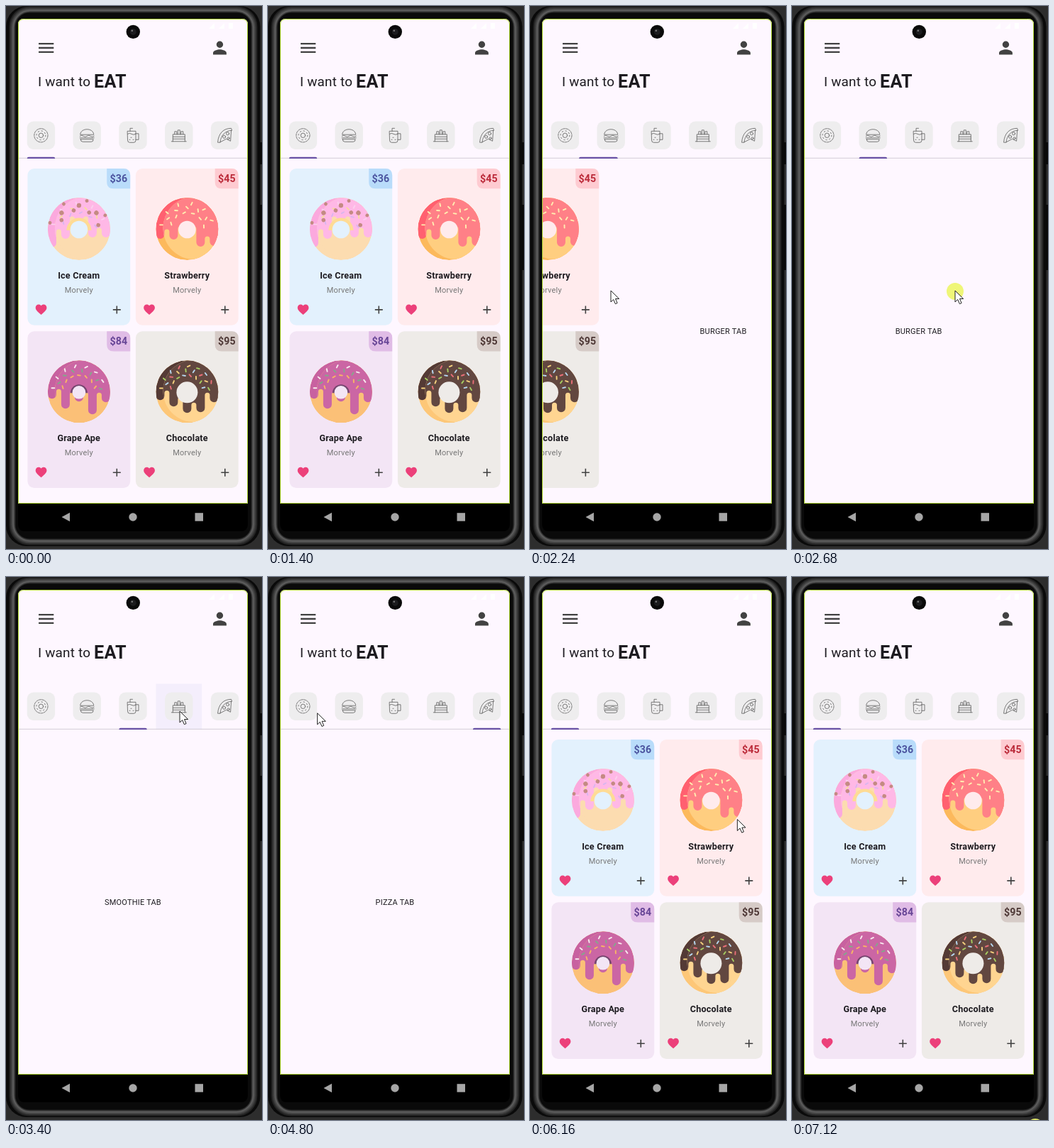
Animation, 361 px wide and 765 px high, one loop 7200 ms. Source, as an HTML page:

```html
<!DOCTYPE html>
<html lang="en">
<head>
<meta charset="utf-8">
<title>Donut menu</title>
<style>
html, body { margin: 0; width: 100%; height: 100%; overflow: hidden; background: #2d2d2d; }
svg { display: block; width: 100%; height: 100%; }
text { font-family: Roboto, sans-serif; letter-spacing: .2px; fill: #1d1b20; }
.mid { text-anchor: middle; }
.icon { fill: none; stroke: #5c5c5c; stroke-width: .8; stroke-linejoin: round; stroke-linecap: round; }
</style>
</head>
<body>
<svg viewBox="0 0 361 765" xmlns="http://www.w3.org/2000/svg">
  <defs>
    <clipPath id="view"><rect x="17.5" y="215" width="323" height="485"/></clipPath>
    <clipPath id="round"><circle r="44"/></clipPath>
    <clipPath id="lit"><circle cx="10" cy="-1" r="44"/></clipPath>
  </defs>

  <rect width="361" height="765" fill="#2d2d2d"/>
  <path d="M357 192h4v31h-4zM357 280h4v92h-4z" fill="#080808"/>
  <rect width="358.5" height="761" rx="29" fill="#0a0a0a"/>
  <g id="shell" fill="none"></g>
  <path d="M17 690H341V730q0 10-10 10H27q-10 0-10-10z" fill="#000"/>
  <path d="M17 701V26q0-8 8-8H333q8 0 8 8V701z" fill="#fef7ff"/>

  <path d="M286 32l8-8v8zM300 32l8-8v8zM314 24h6v8h-6z" fill="#fff"/>
  <circle cx="179.3" cy="36.4" r="9.7" fill="#0a0a0a"/>
  <circle cx="179.3" cy="36.4" r="4.5" fill="#1c1c1e"/>
  <circle cx="177.8" cy="34.8" r="1.3" fill="#777"/>
  <g fill="#424242">
    <path transform="translate(42.5 44.8) scale(1.18)" d="M3 6h18v2H3zM3 11h18v2H3zM3 16h18v2H3z"/>
    <path transform="translate(287.3 44.8) scale(1.18)"
      d="M12 12a4 4 0 1 0 0-8 4 4 0 0 0 0 8zm0 2c-2.67 0-8 1.34-8 4v2h16v-2c0-2.66-5.33-4-8-4z"/>
  </g>
  <text x="45" y="113" font-size="18.9" xml:space="preserve">I want to <tspan dy="2" font-size="25.2" font-weight="700">EAT</tspan></text>

  <rect id="hover" y="150.5" width="64.8" height="64" fill="#f4eefc"/>
  <g id="tabs"></g>
  <path d="M17.5 214.3H340.5" stroke="#d2ccd6"/>
  <path id="bar" fill="#6750a4"/>
  <g id="pages" clip-path="url(#view)"></g>

  <path d="M17.5 700.5V26q0-7.5 8-7.5H332.5q8 0 8 7.5V700.5z" fill="none" stroke="#b5dc35"/>
  <g fill="#a6a6a6">
    <path d="M78.5 720l11.5-6.3v12.6z"/><circle cx="179" cy="720" r="5.7"/>
    <path d="M266.5 714.2h11.5v11.5h-11.5z"/>
  </g>

  <g id="mouse">
    <circle id="press" r="12" cy="1" fill="#eef56c" opacity=".92"/>
    <path d="M0 0V16l3.7-3.5 2.7 6.2 2.7-1.2-2.6-6H11.7z" fill="#fff" stroke="#222"/>
  </g>
</svg>
<script>
const LOOP = 7200, PAGE = 324, TAB = 64.8;
const $ = id => document.getElementById(id);
const clamp = v => Math.max(0, Math.min(1, v));
const mix = (a, b, u) => a + (b - a) * u;
const smooth = u => u * u * (3 - 2 * u);
const repeat = (n, make) => Array.from({ length: n }, (_, i) => make(i)).join('');

// Metal rim: nested outlines, brighter towards the middle
$('shell').innerHTML = repeat(4, i => {
  const inset = 9 + i * .4, grey = 34 + i * 20;
  return `<rect x="${inset}" y="${inset - 4}" width="${359 - 2 * inset}" height="${760 - 2 * inset + 8}"
    rx="24" stroke="rgb(${grey},${grey},${grey})" stroke-width="${9 - i * 2.5}"/>`;
});

// Tab icons, centred on 0,0
const icons = [
  `<circle r="9.6" stroke-dasharray="3 1.2"/><circle r="3.2"/><circle r="6.4" stroke-dasharray="1.5 3.5"/>`,
  `<path d="M-9.5-1.5C-9-11 9-11 9.5-1.5zM-10 1q2.5-2 5 0t5 0 5 0 5 0M-10 3.5h20M-9 5.5H9q0 3.5-3 3.5H-6q-3 0-3-3.5z"/>`,
  `<path d="M-7.5-6H4V7q0 3-3 3h-5.5q-3 0-3-3zM4-2.5h4V6H4M-7.5-2q3-2 5.5 0t6 0M-4-6v-4h3.5M-3 3h1M0 6h1M-5 6h1"/>`,
  `<path d="M-10.5 8.5h21M-8.5 8.5V-1.5h17v10M-8.5 2h17M-8.5 5h17M-6-1.5v-4h3v4M-1.5-1.5v-6h3v6M3-1.5v-4h3v4"/>`,
  `<path d="M-10 9.5C-9-3-2-10 9-10l1 3C1-7-6 0-6.5 9.5zM9-7L8 8 2 5-6.5 9.500"/>
   <circle cx="-1" cy="2" r="2"/><circle cx="4" cy="-2.500" r="2"/><circle cx="5" cy="4" r="1.500"/>`
];
$('tabs').innerHTML = repeat(icons.length, i => {
  const x = 17 + TAB * (i + .5);
  return `<rect x="${x - 19.7}" y="162.5" width="39.4" height="39.4" rx="9" fill="#eeedee"/>
    <g class="icon" transform="translate(${x} 182.3)">${icons[i]}</g>`;
});

// drips: icing lengths from right to left; base and icing: shaded, lit
const donuts = [
  { name: 'Ice Cream', price: 36, card: '#e3f1fd', tag: '#b9dcfa', ink: '#4c55a0',
    base: ['#fcdcb0', '#fcdcb0'], icing: ['#fba9de', '#ffb8e6'], drips: [6, 6, -10, 8, 20],
    hole: 12.3, ring: '#fedb95', ringSize: 17.5, bits: ['#fbd0ee', '#d9b6ee', '#f6dc9c'], count: 14, balls: 11 },
  { name: 'Strawberry', price: 45, card: '#ffebed', tag: '#fecbd1', ink: '#bb2b3a',
    base: ['#fcb95c', '#ffce80'], icing: ['#ff6070', '#ff8087'], drips: [18, 19, 4, 9, 8],
    hole: 12.3, bits: ['#ffedb0'], count: 17 },
  { name: 'Grape Ape', price: 84, card: '#f3e5f5', tag: '#e0bce6', ink: '#674596',
    base: ['#fbc077', '#fbc077'], icing: ['#c861a0', '#cb66a4'], drips: [9, 26, 8, 18, 4],
    hole: 9.3, ring: '#75466f', ringSize: 12, bits: ['#f8e9ee', '#f8b564', '#83a98a'], count: 21 },
  { name: 'Chocolate', price: 95, card: '#eeebe8', tag: '#d6cbc7', ink: '#4e3836',
    base: ['#fdc778', '#ffd591'], icing: ['#543a35', '#624740'], drips: [9, 23, 24, 15, 6],
    hole: 15, bits: ['#f6d17d', '#e96f78', '#b6d8f0', '#a7cf61'], count: 24 }
];

// Round drips 12 wide with round gaps 7 wide between them
function icingPath(drips) {
  return 'M-44 0A44 44 0 0 1 44 0' + drips.map((y, i) => {
    const gap = i < 4 ? `V${Math.min(y, drips[i + 1]) - 4}a3.5 3.5 0 0 0-7 0` : '';
    return `V${y}a6 6 0 0 1-12 0${gap}`;
  }).join('') + 'z';
}

// Spread n marks over the upper half of a donut
function scatter(n, radii, mark) {
  return repeat(n, i => {
    const a = Math.PI * (1.03 + .94 * (i + .5) / n), r = radii[i % 3];
    return `<g transform="translate(${r * Math.cos(a)} ${r * Math.sin(a) + 1}) rotate(${i * 73})">${mark(i)}</g>`;
  });
}

function donutArt(d) {
  const path = icingPath(d.drips);
  const layer = k => `<circle r="44" fill="${d.base[k]}"/><path d="${path}" fill="${d.icing[k]}"/>`;
  const bits = scatter(d.count, [37, 24, 31], i => `<path d="M-1.9 0h3.8" stroke="${d.bits[i % d.bits.length]}"/>`);
  const balls = scatter(d.balls || 0, [42, 28, 34], i => `<circle r="${2.4 + i % 3 * .4}" fill="#c48a83"/>`);
  const ring = d.ring ? `<path d="M${-d.ringSize} 2a${d.ringSize} ${d.ringSize} 0 0 1 ${2 * d.ringSize} 0z" fill="${d.ring}"/>` : '';
  return `<g clip-path="url(#round)">${layer(0)}<g clip-path="url(#lit)">${layer(1)}</g></g>
    <g stroke-width="1.9" stroke-linecap="round">${bits}</g>${ring}${balls}
    <circle cy="1" r="${d.hole}" fill="${d.card}"/>`;
}

function card(d, i) {
  const x = 30.4 + 152.5 * (i % 2), y = 229 + 229.3 * (i >> 1);
  return `<g transform="translate(${x} ${y})">
    <rect width="144.8" height="220.7" rx="9.5" fill="${d.card}"/>
    <path d="M111.8 0h23.5q9.5 0 9.5 9.5V28.3h-23.5q-9.5 0-9.5-9.5z" fill="${d.tag}"/>
    <text class="mid" x="128.5" y="18.6" font-size="14.2" font-weight="700" style="fill:${d.ink}">$${d.price}</text>
    <g transform="translate(72.5 85)">${donutArt(d)}</g>
    <text class="mid" x="72.4" y="155" font-size="12.6" font-weight="700">${d.name}</text>
    <text class="mid" x="72.4" y="174.5" font-size="11" style="fill:#777">Morvely</text>
    <path transform="translate(9.7 189.2) scale(.7875)" fill="#ec407a" d="M12 21.35l-1.45-1.32C5.4 15.36 2 12.28 2 8.5 2 5.42 4.42 3 7.5 3c1.74 0 3.41.81 4.5 2.09C13.09 3.81 14.76 3 16.5 3 19.58 3 22 5.42 22 8.5c0 3.78-3.4 6.86-8.55 11.54z"/>
    <path d="M120.4 198.9h11M125.9 193.4v11" stroke="#424242" stroke-width="1.6"/>
  </g>`;
}

const label = name => `<text class="mid" x="179" y="462" font-size="11">${name} TAB</text>`;
const pages = { 0: donuts.map(card).join(''), 1: label('BURGER'), 2: label('SMOOTHIE'), 4: label('PIZZA') };
$('pages').innerHTML = Object.entries(pages).map(([k, art]) => `<g id="page${k}">${art}</g>`).join('');

// CSS "ease": cubic-bezier(.25, .1, .25, 1)
function ease(u) {
  let lo = 0, hi = 1, s = u;
  for (let i = 0; i < 20; i++) {
    s = (lo + hi) / 2;
    if (.75 * s * (1 - s) + s ** 3 < u) lo = s; else hi = s;
  }
  return .3 * s * (1 - s) ** 2 + 3 * s * s * (1 - s) + s ** 3;
}
// Finger drag for 120 ms, then a fling that slows down
function swipe(u) {
  const ms = u * 510;
  return ms < 120 ? .001 * ms : 1 - .88 * (1 - (ms - 120) / 390) ** 3;
}

const moves = [
  { at: 2000, len: 510, from: 0, to: 1, curve: swipe },
  { at: 2680, len: 510, from: 1, to: 2, curve: swipe },
  { at: 4080, len: 300, from: 2, to: 4, curve: ease },
  { at: 4950, len: 300, from: 4, to: 0, curve: ease }
];
// Pointer trips: leave, arrive, x, y
const trips = [
  [1380, 1960, 153, 401], [2000, 2120, 114, 401], [2400, 2640, 230, 401], [2680, 2800, 191, 401],
  [2920, 3360, 245, 189], [3440, 3720, 306, 188], [4300, 4880, 57, 192],
  [5660, 5860, 292, 338], [6140, 6460, 320, 619], [6660, 6980, 343, 774]
];

function pointer(t) {
  return trips.reduce(([x, y], [leave, arrive, toX, toY]) => {
    const u = smooth(clamp((t - leave) / (arrive - leave)));
    return [mix(x, toX, u), mix(y, toY, u)];
  }, [385, 560]);
}

// A tab lights up once the pointer has been on it for a moment
function hoveredTab(t) {
  const [now, before] = [t, t - 60].map(time => {
    const [x, y] = pointer(time);
    return y > 150 && y < 214 ? Math.floor((x - 17) / TAB) : -1;
  });
  return now === before ? now : -1;
}

function draw(t) {
  const move = moves.filter(m => m.at <= t).pop() || moves[0];
  const { from, to } = move, dir = Math.sign(to - from);
  const p = move.curve(clamp((t - move.at) / move.len));

  for (const k in pages) {
    const on = (+k === from && p < 1) || (+k === to && p > 0);
    const x = +k === from ? -dir * p * PAGE : dir * (1 - p) * PAGE;
    const page = $('page' + k);
    page.style.display = on ? '' : 'none';
    page.setAttribute('transform', `translate(${x} 0)`);
  }

  // Leading edge runs ahead and trailing edge lags
  const lead = mix(p, Math.sin(p * Math.PI / 2), .7);
  const lag = mix(p, 1 - Math.cos(p * Math.PI / 2), .7);
  const left = 29.8 + TAB * mix(from, to, dir > 0 ? lag : lead);
  const right = 69.1 + TAB * mix(from, to, dir > 0 ? lead : lag);
  $('bar').setAttribute('d', `M${left} 215v-.5q0-1.8 2-1.8H${right - 2}q2 0 2 1.8v.5z`);

  const tab = hoveredTab(t);
  $('hover').style.display = tab < 0 ? 'none' : '';
  $('hover').setAttribute('x', 17 + TAB * tab);

  const [x, y] = pointer(t);
  $('mouse').setAttribute('transform', `translate(${x} ${y})`);
  const pressed = t > 7080 || moves.some(m => t >= m.at - 40 && t < m.at + 120);
  $('press').style.display = pressed ? '' : 'none';
}

const start = performance.now();
function tick(now) {
  draw(Math.max(0, now - start) % LOOP);
  requestAnimationFrame(tick);
}
draw(0);
requestAnimationFrame(tick);
</script>
</body>
</html>
```
